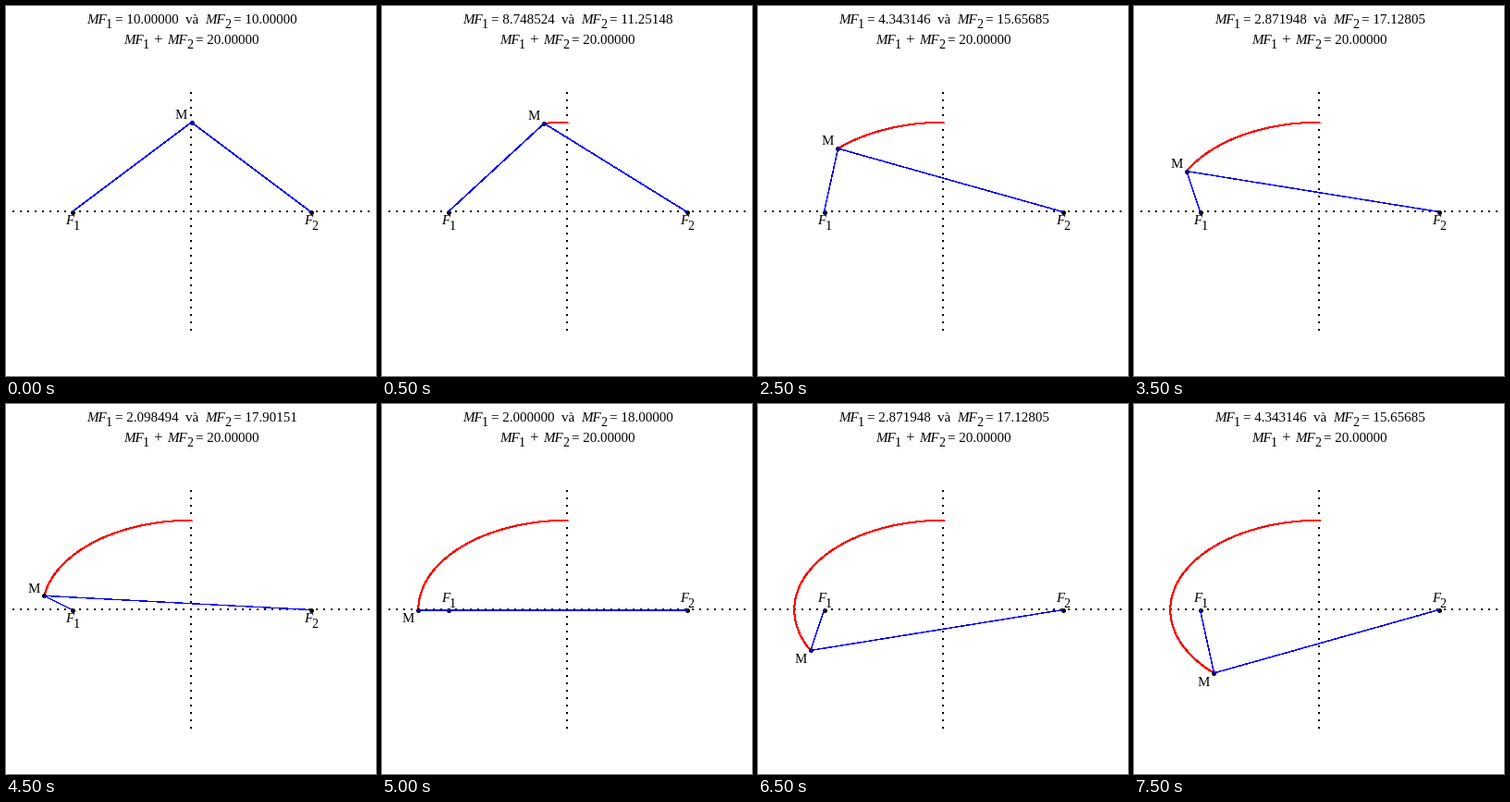
Animation of 400 by 400 pixels, one loop 8000 ms. Source, as a matplotlib script:

```python
import numpy as np
import matplotlib.pyplot as plt
from matplotlib.animation import FuncAnimation

SIZE, DPI = 400, 100
PX = 72 / DPI                  # one pixel in points
CX, CY, UNIT = 200.5, 222.5, 16.125
A, B, C = 10, 6, 8             # half axes and focal distance
FRAMES, INTERVAL, STEP = 16, 500, 9

plt.rcParams["font.family"] = "Liberation Serif"
fig = plt.figure(figsize=(SIZE / DPI, SIZE / DPI), dpi=DPI, facecolor="white")
ax = fig.add_axes([0, 0, 1, 1])
ax.set(xlim=(0, SIZE), ylim=(SIZE, 0))
ax.axis("off")


def put(x, y, s, italic=False, size=15):
    return ax.text(x, y, s, fontsize=size * PX, va="baseline", ha="left",
                   style="italic" if italic else "normal", zorder=6)


def with_index(x, y, name, index, drop=5):
    """Italic name followed by a lowered upright index."""
    advance = 21 if name == "MF" else 8.2
    return put(x, y, name, True), put(x + advance, y + drop, index, size=14)


def line(color, width, z, **kw):
    return ax.plot([], [], color=color, lw=width * PX, zorder=z, **kw)[0]


def ellipse(deg):
    t = np.radians(deg)
    return CX + A * UNIT * np.cos(t), CY - B * UNIT * np.sin(t)


def distances(deg):
    """Focal distances, worked out with seven digits."""
    shift = round(C * round(np.cos(np.radians(deg)), 7), 6)
    return A + shift, A - shift


# Dotted axes
dots = dict(linestyle=(0, (1, 3)), dash_capstyle="butt")
line("black", 2, 1, **dots).set_data([7, 395], [222, 222])
line("black", 2, 1, **dots).set_data([200, 200], [93, 351])

# Heading
with_index(86.9, 19, "MF", "1")
dist1 = put(117.6, 19, "")
put(193.9, 19, "và")
with_index(215, 19, "MF", "2")
dist2 = put(245.8, 19, "")
with_index(127.2, 41, "MF", "1")
put(159.5, 41.5, "+", size=17)
with_index(174, 41, "MF", "2")
total = put(205.2, 41, "")

# Moving parts
trace = line("red", 1, 2, antialiased=False)
rays = line("blue", 0.4, 4, antialiased=False)
points = ax.plot([], [], "o", color="black", ms=5 * PX, mew=0, zorder=3)[0]
label_m = put(0, 0, "M")
foci = [CX - C * UNIT, CX + C * UNIT]
labels_f = [with_index(x - 7.4, 236, "F", n, 6) for x, n in zip(foci, "12")]


def update(i):
    angle = 90 + STEP * i
    x, y = ellipse(angle)
    upper = angle < 180

    d1, d2 = distances(angle)
    for text, value in ((dist1, d1), (dist2, d2), (total, d1 + d2)):
        text.set_text(f"= {value:#.7g}")

    if i:
        trace.set_data(*ellipse(np.linspace(90, angle, 12 * i + 1)))
    else:
        trace.set_data([], [])
    rays.set_data([foci[0], x, foci[1]], [CY, y, CY])
    points.set_data([foci[0], x, foci[1]], [CY, y, CY])

    label_m.set_position((x - 17.7, y - 3.7 if upper else y + 13.8))
    base = 236 if upper else 214
    for name, index in labels_f:
        name.set_y(base)
        index.set_y(base + 6)
    return trace, rays, points, label_m


anim = FuncAnimation(fig, update, frames=FRAMES, interval=INTERVAL,
                     init_func=lambda: update(0), repeat=True, repeat_delay=0)
plt.show()
```
